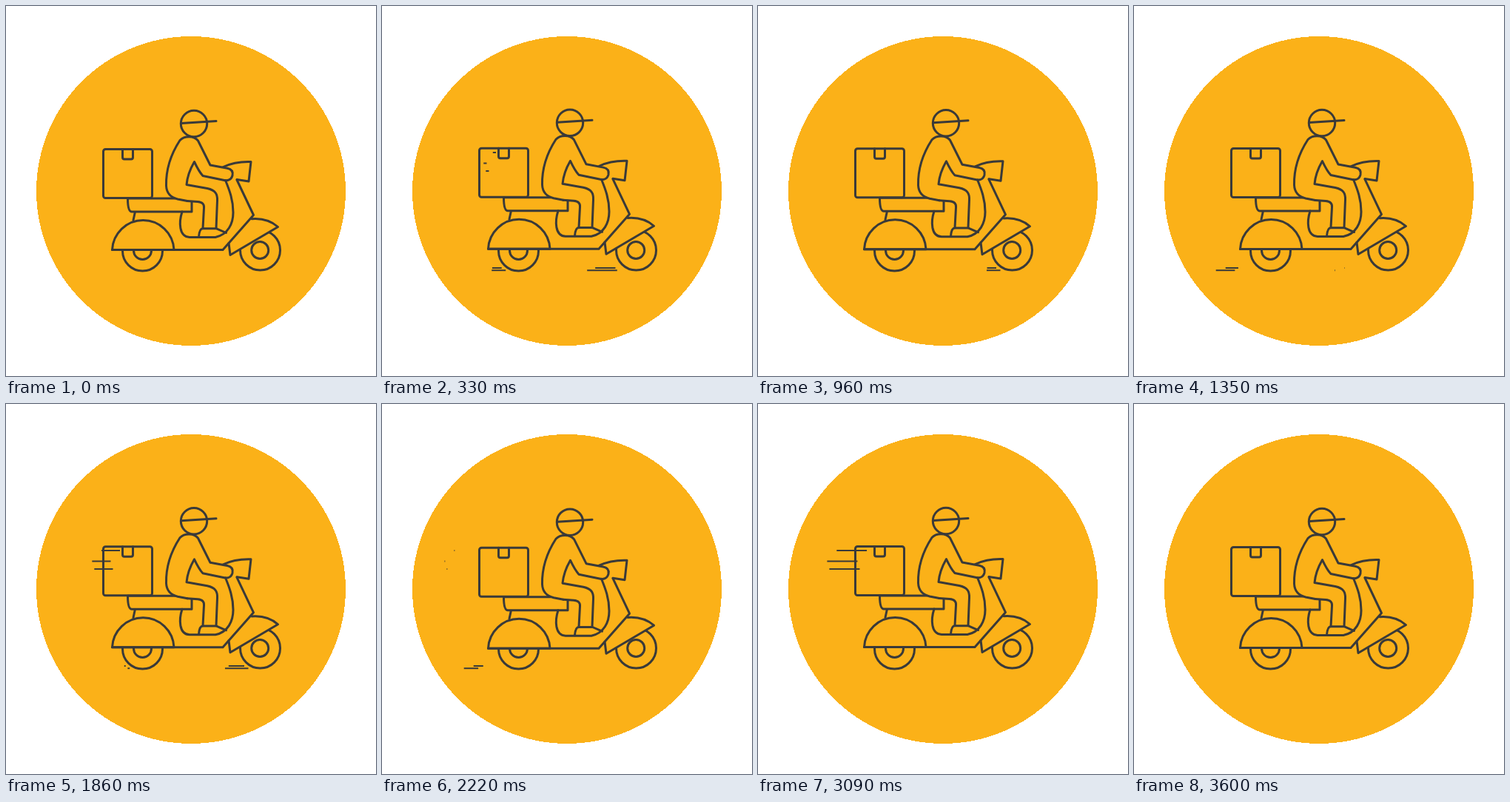
Recreate the animation shown at these times as an HTML page. Size 500 px wide and 500 px high, loop 3630 ms.

```html
<!DOCTYPE html>
<html lang="en">
<head>
<meta charset="utf-8">
<title>Scooter delivery</title>
<style>
  html, body { margin: 0; width: 100%; height: 100%; overflow: hidden; background: #fff; }
  svg { display: block; width: 500px; height: 500px; }
  .ink { fill: none; stroke: #3a3a39; stroke-width: 3; stroke-linecap: round; stroke-linejoin: round; }
  .solid { fill: #fbb118; }
  .dash { stroke: #3a3a39; stroke-width: 2; }
</style>
</head>
<body>
<svg viewBox="0 0 500 500">
  <circle class="solid" cx="250" cy="250" r="209" shape-rendering="crispEdges"/>
  <g class="ink">
    <circle cx="184.5" cy="331" r="27"/>
    <circle cx="184.5" cy="330.5" r="12"/>
    <circle cx="343.5" cy="330" r="27"/>
    <circle cx="343.2" cy="330" r="11.5"/>
  </g>
  <g id="body" class="ink">
    <!-- scooter -->
    <path class="solid" d="M143.5 329.5A41.8 42 0 0 1 227 329.5Z"/>
    <path class="solid" d="M332 287.7C347 286.5 359 291 367.5 298.5L303 336.5L301 320.5Z" stroke="none"/>
    <path d="M143.5 329.5H293L334.5 282.5L312 235"/>
    <path d="M332 287.7C347 286.5 359 291 367.5 298.5L303 336.5L301 320.5"/>
    <path d="M293.5 217.5C305 212 317 210 331 210.5L328 237L312 234.5"/>
    <path d="M164.5 260H228M164.5 260C164.5 270 165.5 278 170 278H251V264.5M174.5 278L172 289.5"/>
    <path d="M238 278C233.5 292 233.5 312 248 312.5H283C300 309 307 294 307 279C307 262 302 249 296.5 235.5"/>
    <!-- rider -->
    <circle cx="254" cy="159" r="17.7"/>
    <path d="M236.5 158.5L284 155.5"/>
    <path d="M245 263.5L232 261C222 258.5 217 253 216.5 243C216 223 221 203 235 181.500C241 175 254 175 259.500 182L276 215L299 219.300C305 220.500 307 224 306 229C304.500 234.500 300 236.500 295 235.500L266 229.500C261 224 258 218 254.500 210.500C249 220 245 230 244 241.500L272 246.500C283 249 286 254 285.500 263L284 300.500"/>
    <path d="M245 263.5L259 264.5C265.500 265 268 268 267.500 273L266 300.500"/>
    <path d="M260.500 312C261 305 262.500 300.800 266 300.800H284.500L297.500 306.500"/>
    <!-- parcel -->
    <rect x="131.5" y="193.5" width="66" height="66" rx="3"/>
    <path d="M157.500 193.500V204.500q0 2.500 2.500 2.500H169q2.500 0 2.500-2.500V193.500"/>
  </g>
  <g id="dashes"></g>
</svg>
<script>
  const LOOP = 3630, STEP = 30, GROW = 360, LAG = 191;
  const body = document.getElementById('body');
  const layer = document.getElementById('dashes');

  const ease = u => {
    u = Math.min(1, Math.max(0, u));
    return u * u * (3 - 2 * u);
  };

  // Each dash runs from right to left; its tail follows its head.
  const dashes = [];
  function addDash(right, left, y, starts) {
    const el = document.createElementNS('http://www.w3.org/2000/svg', 'line');
    el.setAttribute('class', 'dash');
    el.setAttribute('y1', y);
    el.setAttribute('y2', y);
    layer.append(el);
    dashes.push({ el, right, left, starts });
  }

  const gusts = [270, 1694, 2820];
  addDash(154, 97.5, 198, gusts);
  addDash(141.5, 84.5, 212.5, gusts);
  addDash(144.5, 87.5, 223, gusts);

  function addGround(x, starts) {
    addDash(x + 56.5, x, 357.2, starts);
    addDash(x + 51, x + 13, 354, starts);
  }
  addGround(271, [44, 822, 1666]);
  addGround(110.7, [190, 968, 1811]);

  // Bounce: alternate low and high between a rest pose at both ends.
  const REST = 0, HIGH = -1.2, LOW = 0.7;
  const bob = [[0, REST]];
  for (let i = 0; i < 12; i++) bob.push([330 + 270 * i, i % 2 ? LOW : HIGH]);
  bob.push([LOOP, REST]);

  function bounce(t) {
    const i = bob.findIndex(k => k[0] > t);
    const [t0, y0] = bob[i - 1], [t1, y1] = bob[i];
    return y0 + (y1 - y0) * ease((t - t0) / (t1 - t0));
  }

  function draw(now) {
    const t = Math.floor((now % LOOP) / STEP) * STEP;
    body.setAttribute('transform', `translate(0 ${bounce(t).toFixed(3)})`);
    for (const { el, right, left, starts } of dashes) {
      const start = starts.find(s => t > s && t < s + GROW + LAG);
      el.style.display = start === undefined ? 'none' : '';
      if (start === undefined) continue;
      const at = ms => right + (left - right) * ease(ms / GROW);
      el.setAttribute('x1', at(t - start));
      el.setAttribute('x2', at(t - start - LAG));
    }
  }

  const origin = performance.now();
  function tick() {
    draw(performance.now() - origin);
    requestAnimationFrame(tick);
  }
  tick();
</script>
</body>
</html>
```
